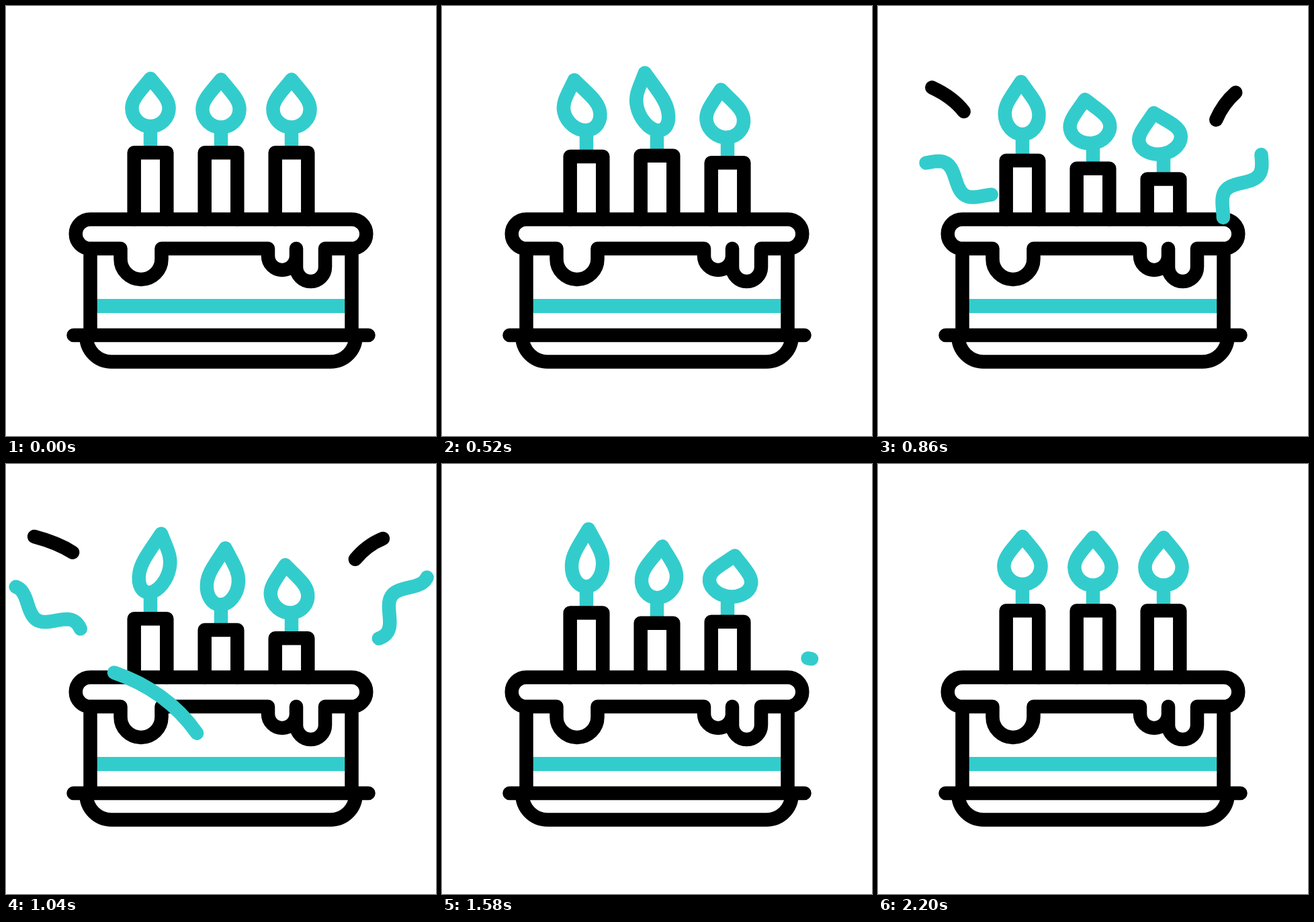
An HTML page with a canvas for the animation above (2.4 s loop, 640 px wide and 640 px high).

```html
<!DOCTYPE html>
<html lang="en">
<head>
<meta charset="utf-8">
<title>Birthday cake</title>
<style>
  html, body { margin: 0; width: 100%; height: 100%; overflow: hidden; background: #fff; }
  canvas { display: block; width: 100%; height: 100%; }
</style>
</head>
<body>
<canvas id="stage" width="640" height="640"></canvas>
<script>
const ctx = document.getElementById('stage').getContext('2d');
const LOOP = 2400, LINE = 20.5, INK = '#000', TEAL = '#33cccc';

const ramp = (t, [from, to]) => Math.min(1, Math.max(0, (t - from) / (to - from)));
const smooth = u => (1 - Math.cos(Math.PI * u)) / 2;

// Eases from pose to pose; each pose is [time, value].
const through = (poses, t) => poses.slice(1).reduce((value, [time, next], i) =>
  value + (next - poses[i][1]) * smooth(ramp(t, [poses[i][0], time])), poses[0][1]);

// All flames share one flicker and all candles one dip, each with its own delay.
const flameHeight = t => through(
  [[0, 71], [180, 62], [420, 86], [640, 60], [1010, 88], [1320, 60], [1560, 86], [1740, 71]], t);
const flameLean = t => through(
  [[100, 0], [450, -19], [740, -12], [1040, 16], [1320, 11], [1720, 0]], t);
const dip = t => smooth(ramp(t, [150, 900])) - smooth(ramp(t, [1100, 1850]));

const candles = [
  { x: 215, gap: 29, depth: 12, dipDelay: 0, flameDelay: 0 },
  { x: 320, gap: 27.5, depth: 29, dipDelay: 175, flameDelay: 120 },
  { x: 425, gap: 27.5, depth: 41, dipDelay: 60, flameDelay: 240 }
];

// A wavy line between two points, with the same phase at every outer end.
function wave([x0, y0], [x1, y1]) {
  const dx = x1 - x0, dy = y1 - y0, length = Math.hypot(dx, dy), points = [];
  for (let u = 0; u <= 1; u += 1 / 80) {
    const side = 13.5 * Math.cos(2 * Math.PI * (2.75 * (1 - u) - 0.54)) / length;
    points.push([x0 + dx * u + dy * side, y0 + dy * u - dx * side]);
  }
  return 'M' + points.join('L');
}

// The line is drawn on during `head` and wiped away during `tail`.
function streamer(d, color, head, tail) {
  const probe = document.createElementNS('http://www.w3.org/2000/svg', 'path');
  probe.setAttribute('d', d);
  return { path: new Path2D(d), length: probe.getTotalLength(), color, head, tail };
}

const burst = [[540, 985], [564, 1295]];
const streamers = [
  streamer('M146 198C138 158 110 126 42 108', INK, ...burst),
  streamer('M494 206C498 163 524 126 561 111', INK, ...burst),
  streamer(wave([237, 330], [8, 194]), TEAL, ...burst),
  streamer(wave([458, 379], [616, 161]), TEAL, ...burst),
  streamer('M300 427C250 330 140 285 31 297', TEAL, [880, 1155], [984, 1328]),
  streamer('M318 421C330 330 430 270 550 290', TEAL, [1210, 1485], [1242, 1586])
];

const cake = new Path2D(`
  M125.5 361V490M514.5 361V490M100.5 490H539.5
  M119.5 490V492A37.5 37.5 0 0 0 157 529.5H483A37.5 37.5 0 0 0 520.5 492V490
  M125.5 317.5H514.5A21.75 21.75 0 0 1 514.5 361H475V388.5A21.5 21.5 0 0 1 432 388.5V361
  V372A21 21 0 0 1 390 372V361H231.5V376.5A30.5 30.5 0 0 1 170.5 376.5V361H125.5
  A21.75 21.75 0 0 1 125.5 317.5Z`);

function stroke(path, color, cap = 'round') {
  ctx.strokeStyle = color;
  ctx.lineCap = cap;
  ctx.stroke(path);
}

function flamePath(x, bottom, height, lean) {
  const path = new Path2D();
  const half = 27.6 - 0.31 * (height - 71);
  const tilt = lean * (78 - height) * 0.025;
  // u: sideways in half widths, v: upwards in heights
  const at = (u, v) => [x + u * half + lean * v, bottom - v * height + u * tilt];
  const bend = (a, b, c) => path.bezierCurveTo(...a, ...b, ...c);
  path.moveTo(...at(0, 1));
  bend(at(0.58, 0.72), at(1, 0.575), at(1, 0.38));
  bend(at(1, 0.17), at(0.55, 0), at(0, 0));
  bend(at(-0.55, 0), at(-1, 0.17), at(-1, 0.38));
  bend(at(-1, 0.575), at(-0.58, 0.72), at(0, 1));
  path.closePath();
  return path;
}

function drawCandle({ x, gap, depth, dipDelay, flameDelay }, t) {
  const top = 208 + depth * dip(t - dipDelay), bottom = top - gap, flicker = t - flameDelay;
  stroke(new Path2D(`M${x} ${bottom}V${top + 8}`), TEAL, 'butt');
  stroke(flamePath(x, bottom, flameHeight(flicker), flameLean(flicker)), TEAL);
  stroke(new Path2D(`M${x - 24.3} 317.5V${top + 10.2}H${x + 24.3}V317.5`), INK);
}

function drawStreamer({ path, length, color, head, tail }, t) {
  const start = ramp(t, tail) ** 1.3 * length, size = ramp(t, head) * length - start;
  if (size <= 0.01) return;
  ctx.setLineDash([size, 9999]);
  ctx.lineDashOffset = -start;
  stroke(path, color);
  ctx.setLineDash([]);
}

function draw(now) {
  const t = now % LOOP;
  ctx.fillStyle = '#fff';
  ctx.fillRect(0, 0, 640, 640);
  ctx.lineWidth = LINE;
  ctx.lineJoin = 'round';
  candles.forEach(c => drawCandle(c, t));
  ctx.fillStyle = TEAL;
  ctx.fillRect(130, 436, 380, 21);
  stroke(cake, INK);
  streamers.forEach(s => drawStreamer(s, t));
}

const began = performance.now();
function tick() {
  draw(performance.now() - began);
  requestAnimationFrame(tick);
}
tick();
</script>
</body>
</html>
```
